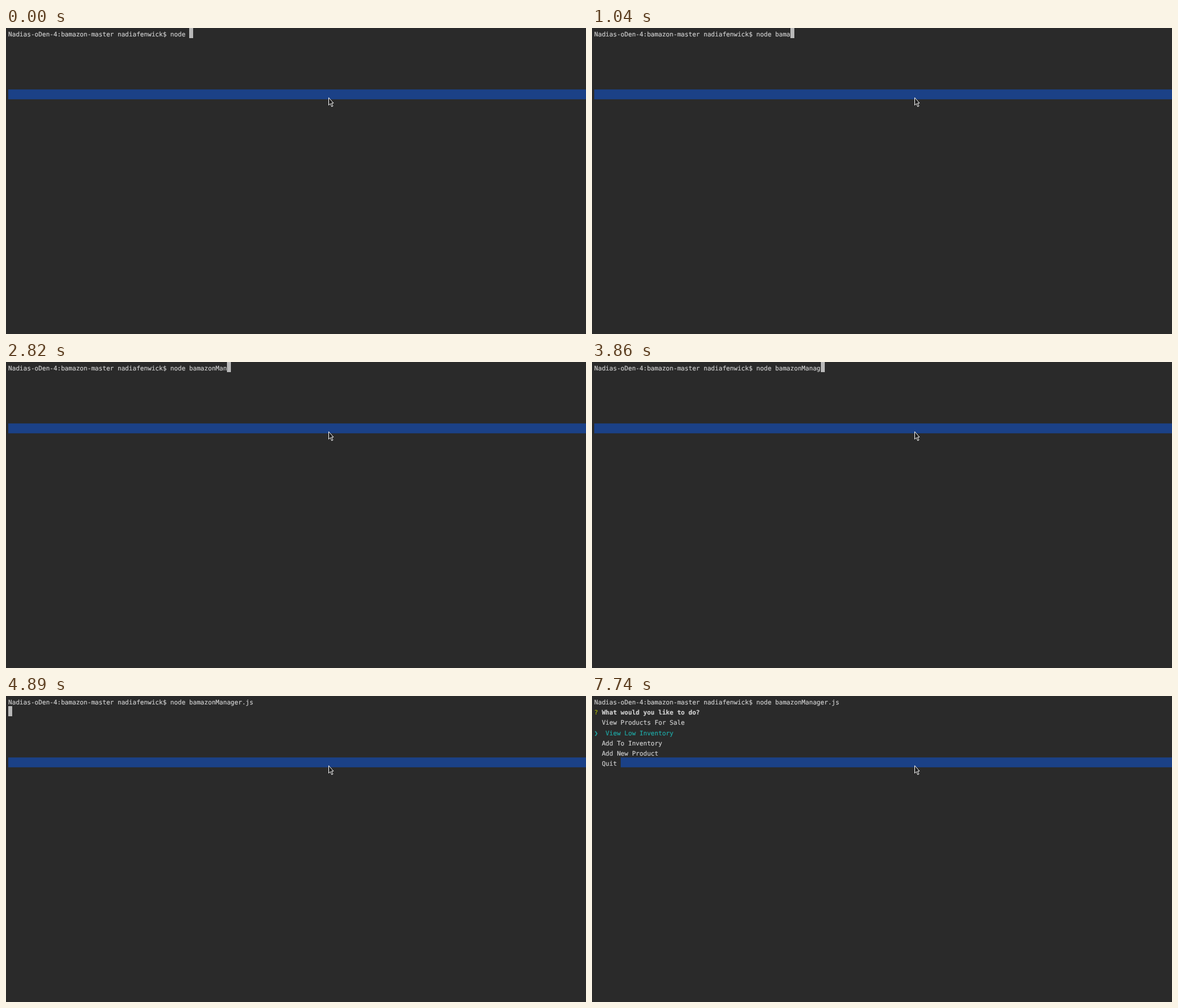
Write an HTML page that moves like this. It is 1029 by 544 pixels and loops after 8000 ms.

```html
<!DOCTYPE html>
<html lang="en">
<head>
<meta charset="utf-8">
<title>Terminal</title>
<style>
html, body { margin: 0; width: 100%; height: 100%; overflow: hidden; background: #2a2a2a; }
pre, #band, #cursor, svg { position: absolute; margin: 0; }
pre {
  left: 4px; top: 3px; color: #cdcdcd;
  font: 11.12px/18.17px "DejaVu Sans Mono", monospace;
  text-rendering: geometricPrecision;
  -webkit-text-stroke: .2px;
}
#band {
  right: 0; top: 109px; height: 16px;
  background: #1b4187; border-block: 1px solid #1e3b70;
}
#cursor { width: 7px; height: 18px; background: #b9b9b9; }
svg { left: 566px; top: 118px; }
.ask { color: #abb800; }
.pick { color: #1fa8a5; }
i { display: inline-block; width: 1ch; font-style: normal; line-height: 1; }
</style>
</head>
<body>
<div id="band"></div>
<div id="cursor"></div>
<pre id="screen"></pre>
<svg width="20" height="26">
  <path d="M6.5 5.8V19.2L9.6 16.3L11.8 21.8L14 20.8L11.7 15.5H15Z" fill="#1c1c1c" stroke="#fff" stroke-linejoin="round"/>
</svg>
<script>
const LOOP = 8000, CELL = 6.695, LEFT = 4;
const ENTER = 4890, MENU = 5190, DOWN = 7740;
const prompt = "Nadias-oDen-4:bamazon-master nadiafenwick$ node ";
const command = "bamazonManager.js";
// Time at which each character of the command appears
const keys = [740, 890, 1040, 1040, 1480, 1630, 1780, 2670, 2820, 2820, 2970,
  3860, 4000, 4150, 4440, 4590, 4740];
const blinks = [[440, 740], [3410, 3860]];
const choices = ["View Products For Sale", "View Low Inventory", "Add To Inventory",
  "Add New Product", "Quit"];

const [band, cursor, screen] = ["band", "cursor", "screen"].map(id => document.getElementById(id));
const column = n => Math.round(LEFT + n * CELL) + "px";
let shown = "";

function menu(picked, hint) {
  const rows = choices.map((text, i) =>
    i === picked ? `<span class="pick"><i>❯</i>  ${text}</span>` : "  " + text);
  return `\n<span class="ask">?</span> <b>What would you like to do?</b>${hint}\n` + rows.join("\n");
}

function draw(now) {
  const t = now % LOOP;
  const typed = keys.filter(k => k <= t).length;
  let html = prompt + command.slice(0, typed);
  if (t >= MENU) html += t < DOWN ? menu(0, " (Use arrow keys)") : menu(1, "");
  if (html !== shown) screen.innerHTML = shown = html;

  const entered = t >= ENTER;
  const hidden = t >= MENU || blinks.some(([a, b]) => t >= a && t < b);
  cursor.style.visibility = hidden ? "hidden" : "visible";
  cursor.style.left = entered ? LEFT + "px" : column(prompt.length + typed);
  cursor.style.top = entered ? "18px" : "0";
  band.style.left = t < MENU ? LEFT + "px" : column(7);
  requestAnimationFrame(draw);
}
draw(performance.now());
</script>
</body>
</html>
```
